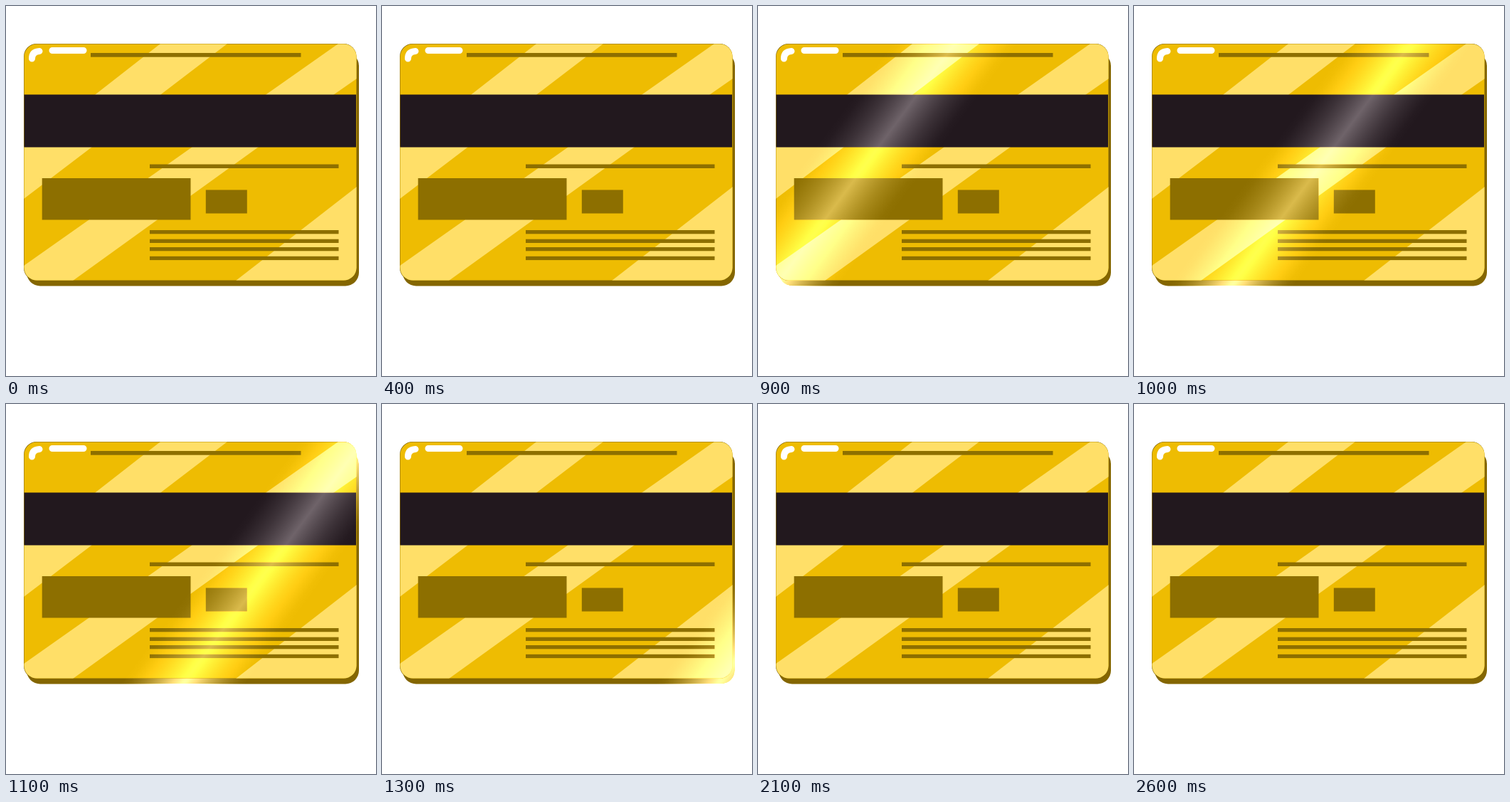
Animation of 520x520 px, one loop 2.7 s. Source, as an HTML page with a canvas:

```html
<!DOCTYPE html>
<html lang="en">
<head>
<meta charset="utf-8">
<style>
  html, body { margin: 0; height: 100%; overflow: hidden; background: #fff; }
  canvas { display: block; }
</style>
</head>
<body>
<canvas id="stage" width="520" height="520"></canvas>
<script>
const ctx = document.getElementById('stage').getContext('2d');
const LOOP = 2700, STEP = 100;
const SLANT = 0.74, HALF_WIDTH = 88;
const GOLD = '#eebc02', LIGHT = '#ffdf68', BROWN = '#8d6f00', DARK = '#22181e';

function rounded(x, y, w, h, r, fill) {
  ctx.beginPath();
  ctx.roundRect(x, y, w, h, r);
  ctx.fillStyle = fill;
  ctx.fill();
}

function polygon(...points) {
  ctx.beginPath();
  points.forEach(([x, y]) => ctx.lineTo(x, y));
  ctx.fill();
}

function bar(x, y, w, h) {
  ctx.fillRect(x, y, w, h);
}

// Adds a slanted band of light centred on the line x + SLANT * y = c.
function glint(c, strength) {
  const scale = 1 / (1 + SLANT * SLANT);
  const from = (c - HALF_WIDTH) * scale, to = (c + HALF_WIDTH) * scale;
  const gradient = ctx.createLinearGradient(from, from * SLANT, to, to * SLANT);
  for (let i = 0; i <= 16; i++) {
    const d = Math.abs(i / 8 - 1);
    gradient.addColorStop(i / 16, `rgba(255,250,250,${strength * (1 - d) ** 1.5})`);
  }
  ctx.save();
  ctx.globalCompositeOperation = 'lighter';
  ctx.fillStyle = gradient;
  ctx.fillRect(0, 0, 520, 520);
  ctx.restore();
}

function drawFace() {
  ctx.save();
  ctx.beginPath();
  ctx.roundRect(25.5, 53.5, 467, 332, 18);
  ctx.clip();
  ctx.fillStyle = GOLD;
  bar(25, 53, 468, 333);

  ctx.fillStyle = LIGHT;
  polygon([217, 53], [311, 53], [218, 124], [121, 198], [25, 271], [25, 198], [126, 124]);
  polygon([467, 53], [493, 53], [493, 102], [355, 198], [94, 386], [25, 386], [25, 365], [262, 198], [366, 124]);
  polygon([493, 254], [493, 386], [323, 386]);

  ctx.fillStyle = DARK;
  bar(25, 124.5, 467, 74);
  ctx.fillStyle = BROWN;
  bar(119, 66, 295.5, 5.7);
  bar(202, 222.5, 265.5, 5.5);
  for (const y of [315, 327.7, 339, 351.8]) bar(202, y, 265.5, 5.3);
  bar(50.7, 242, 208.8, 58.5);
  bar(280.8, 258.5, 58, 33);
  ctx.restore();
}

function drawShine() {
  ctx.strokeStyle = '#fff';
  ctx.lineWidth = 9;
  ctx.lineCap = 'round';
  ctx.beginPath();
  ctx.moveTo(36.5, 74);
  ctx.quadraticCurveTo(36.5, 64, 47, 63.5);
  ctx.moveTo(65, 62.5);
  ctx.lineTo(109, 62.5);
  ctx.stroke();
}

function draw(time) {
  const c = 92 + 112 * (Math.floor(time / STEP) - 7);
  ctx.fillStyle = '#fff';
  ctx.fillRect(0, 0, 520, 520);
  rounded(29, 65, 467, 328.5, 19, '#846600');
  glint(c, 0.35);
  rounded(25, 53, 467.5, 333, 18, '#7a6005');
  drawFace();
  glint(c, 0.3);
  drawShine();
}

function tick() {
  draw(performance.now() % LOOP);
  requestAnimationFrame(tick);
}
tick();
</script>
</body>
</html>
```
